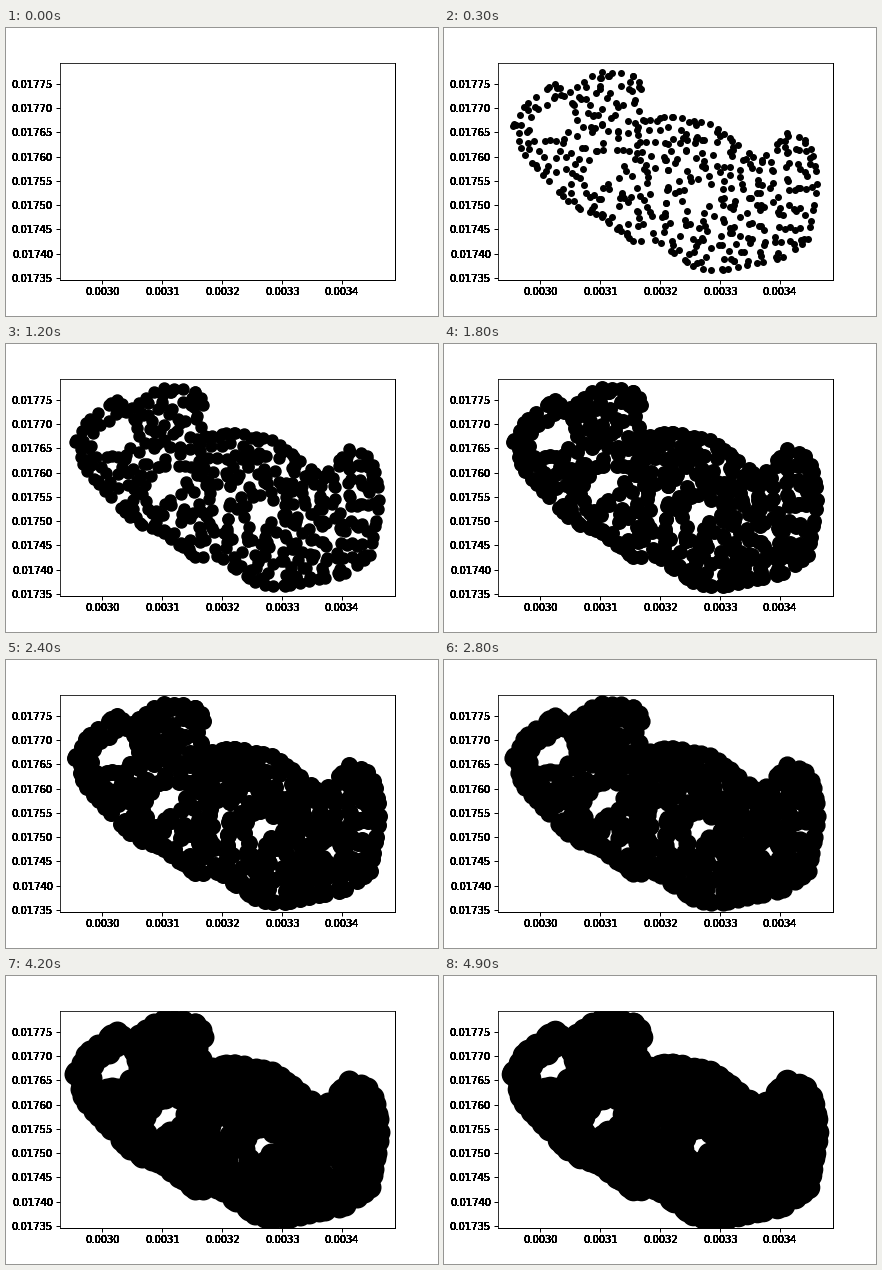
A matplotlib script for the animation above (5000 ms loop, 432 px wide and 288 px high).

```python
import numpy as np
import matplotlib.pyplot as plt
from matplotlib.animation import FuncAnimation
from matplotlib.path import Path

WIDTH, HEIGHT, DPI = 432, 288, 72
FRAMES, INTERVAL = 50, 100
AXES_RECT = (0.125, 0.125, 0.775, 0.755)
X_LIMITS = (0.0029291, 0.0034881)
Y_LIMITS = (0.01734571, 0.01779404)
LABEL_PASSES = 24  # stacked passes turn the soft glyph edges solid
LABEL_PAD = 7

# Corners of the cloud in stage pixels, clockwise.
OUTLINE = np.array([
    (69, 97), (82, 77), (112, 54), (120, 68), (154, 44), (188, 46),
    (198, 58), (190, 74), (200, 93), (225, 88), (267, 96), (316, 134),
    (345, 103), (366, 115), (374, 150), (364, 212), (337, 230), (277, 242),
    (253, 241), (212, 212), (188, 213), (157, 188), (128, 178), (79, 125),
])
HOLES = [(104, 92, 14), (157, 137, 13), (256, 166, 14.5)]  # x, y, radius


def rim_dots(rng, spacing):
    """Scatter dots along the outline at roughly even spacing."""
    loop = np.vstack([OUTLINE, OUTLINE[:1]])
    lengths = np.hypot(*np.diff(loop, axis=0).T)
    along = np.concatenate([[0], np.cumsum(lengths)])
    stops = np.arange(0, along[-1], spacing)
    stops += rng.uniform(-0.4, 0.4, stops.size) * spacing
    return np.column_stack([np.interp(stops, along, axis) for axis in loop.T])


def inner_dots(rng, step):
    """Loosely jittered grid, kept inside the outline and off the holes."""
    low, high = OUTLINE.min(axis=0), OUTLINE.max(axis=0)
    xs, ys = np.meshgrid(np.arange(low[0], high[0], step),
                         np.arange(low[1], high[1], step))
    dots = np.column_stack([xs.ravel(), ys.ravel()])
    dots += rng.uniform(-0.75 * step, 0.75 * step, dots.shape)
    keep = Path(OUTLINE).contains_points(dots)
    for x, y, radius in HOLES:
        keep &= np.hypot(dots[:, 0] - x, dots[:, 1] - y) > radius
    return dots[keep]


def to_data(dots):
    left, bottom, width, height = AXES_RECT
    u = (dots[:, 0] / WIDTH - left) / width
    v = (1 - dots[:, 1] / HEIGHT - bottom) / height
    return (X_LIMITS[0] + u * (X_LIMITS[1] - X_LIMITS[0]),
            Y_LIMITS[0] + v * (Y_LIMITS[1] - Y_LIMITS[0]))


def label_ticks(ax, x_ticks, y_ticks):
    x_place, x_va, x_ha = ax.get_xaxis_text1_transform(LABEL_PAD)
    y_place, y_va, y_ha = ax.get_yaxis_text1_transform(LABEL_PAD)
    for _ in range(LABEL_PASSES):
        for x in x_ticks:
            ax.text(x, 0, f"{x:.4f}", transform=x_place, va=x_va, ha=x_ha)
        for y in y_ticks:
            ax.text(0, y, f"{y:.5f}", transform=y_place, va=y_va, ha=y_ha)


def style_axes(ax):
    x_ticks = 0.0030 + 0.0001 * np.arange(5)
    y_ticks = 0.01735 + 0.00005 * np.arange(9)
    ax.set_xticks(x_ticks)
    ax.set_yticks(y_ticks)
    ax.tick_params(length=4, width=1, labelbottom=False, labelleft=False)
    for side in ("bottom", "right"):
        ax.spines[side].set_linewidth(1)
    ax.set_xlim(X_LIMITS)
    ax.set_ylim(Y_LIMITS)
    label_ticks(ax, x_ticks, y_ticks)


plt.rcParams.update({"font.family": "DejaVu Sans", "font.size": 10})
fig = plt.figure(figsize=(WIDTH / DPI, HEIGHT / DPI), dpi=DPI,
                 facecolor="white")
ax = fig.add_axes(AXES_RECT)
rng = np.random.default_rng(7)
cloud = np.vstack([rim_dots(rng, 9.5), inner_dots(rng, 9.3)])
scatter = ax.scatter(*to_data(cloud), s=10, color="black", linewidths=1.5)
style_axes(ax)


def update(frame):
    scatter.set_visible(frame > 0)
    scatter.set_sizes([10 * frame])
    return [scatter]


anim = FuncAnimation(fig, update, frames=FRAMES, interval=INTERVAL,
                     repeat=True, blit=False)
plt.show()
```
